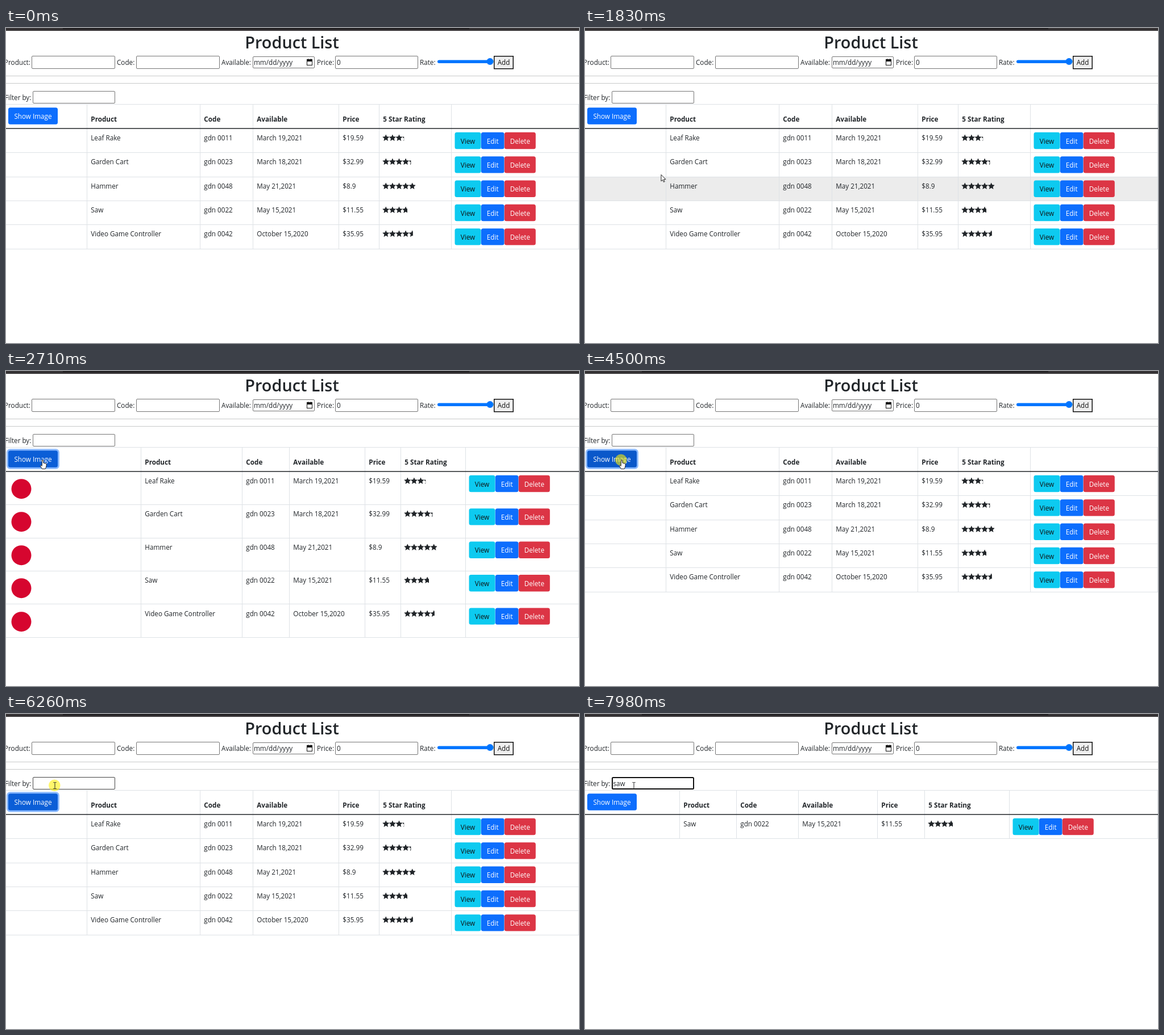
An HTML page with a canvas that plays this animation: 1008x555 px, repeating every 8000 ms.

```html
<!DOCTYPE html>
<html lang="en">
<head>
<meta charset="utf-8">
<title>Product List</title>
<style>
html, body { margin: 0; width: 100%; height: 100%; overflow: hidden; background: #fff; }
canvas { display: block; width: 1008px; height: 555px; }
</style>
</head>
<body>
<canvas id="stage" width="1008" height="555"></canvas>
<script>
const ctx = document.getElementById('stage').getContext('2d');
const LOOP = 8000;
const INK = '#212529', LINE = '#dee2e6', BLUE = '#0d6efd';
const FAMILY = '"Open Sans", "Noto Sans", sans-serif';
const BODY = '11.7px ' + FAMILY;
const BOLD = 'bold 11.7px ' + FAMILY;
const TITLE = '600 28.8px ' + FAMILY;
const TABLE_TOP = 177.3;

const products = [
  { name: 'Leaf Rake', code: 'gdn 0011', date: 'March 19,2021', price: '$19.59', stars: 3.25 },
  { name: 'Garden Cart', code: 'gdn 0023', date: 'March 18,2021', price: '$32.99', stars: 4.3 },
  { name: 'Hammer', code: 'gdn 0048', date: 'May 21,2021', price: '$8.9', stars: 5 },
  { name: 'Saw', code: 'gdn 0022', date: 'May 15,2021', price: '$11.55', stars: 3.75 },
  { name: 'Video Game Controller', code: 'gdn 0042', date: 'October 15,2020', price: '$35.95', stars: 4.6 }
];
const heads = ['Product', 'Code', 'Available', 'Price', '5 Star Rating'];
const layouts = {
  plain: { cols: [142, 341, 434, 585, 656, 783], h: 42.35 },
  images: { cols: [237, 415, 498, 631, 694, 808], h: 58.4 },
  filtered: { cols: [166, 266, 375, 514, 597, 746], h: 42.35 }
};

// press, effect and end of the highlight
const clicks = [
  [2500, 2660, 2710], [3780, 3920, 4060], [4430, 4570, 4710],
  [5030, 5180, 5260], [6260, 6330, 6480]
];
const FOCUS = 6330;
const typed = [[7590, 'saw'], [7470, 'sa'], [7130, 's']];

// pointer path: time, x, y
const path = [
  [1180, 236, 550], [1706, 148, 279], [1970, 92, 197], [2050, 75, 176.5],
  [2112, 69, 172], [2360, 64, 157], [5510, 64, 157], [5950, 86, 126]
];
// spans where the pointer advances in regular steps
const spans = [[1180, 1970, 65.8], [2050, 2360, 62], [5510, 5950, 73.3]];

function stepTime(t) {
  const s = spans.filter(s => t >= s[0]).pop();
  if (!s) return 0;
  return Math.min(s[1], s[0] + Math.floor((t - s[0]) / s[2]) * s[2]);
}

function pointerAt(t) {
  const q = stepTime(t);
  if (q < path[0][0]) return null;
  for (let i = 1; i < path.length; i++) {
    const a = path[i - 1], b = path[i];
    if (q <= b[0]) {
      const k = (q - a[0]) / (b[0] - a[0]);
      return { x: a[1] + (b[1] - a[1]) * k, y: a[2] + (b[2] - a[2]) * k };
    }
  }
  const end = path[path.length - 1];
  return { x: end[1], y: end[2] };
}

function rect(x, y, w, h, color) {
  ctx.fillStyle = color;
  ctx.fillRect(x, y, w, h);
}

function rounded(x, y, w, h, r, color) {
  ctx.beginPath();
  ctx.roundRect(x, y, w, h, r);
  ctx.fillStyle = color;
  ctx.fill();
}

function disc(x, y, r, color) {
  ctx.beginPath();
  ctx.arc(x, y, r, 0, Math.PI * 2);
  ctx.fillStyle = color;
  ctx.fill();
}

function text(s, x, y, color = INK, font = BODY, align = 'left') {
  ctx.font = font;
  ctx.textAlign = align;
  ctx.fillStyle = color;
  ctx.fillText(s, x, y);
}

function field(x, y, w, h, color = '#767676', width = 1) {
  ctx.beginPath();
  ctx.roundRect(x + width / 2, y + width / 2, w - width, h - width, 1.5);
  ctx.fillStyle = '#fff';
  ctx.fill();
  ctx.strokeStyle = color;
  ctx.lineWidth = width;
  ctx.stroke();
}

function button(label, x, y, w, h, fill, color = '#fff') {
  rounded(x, y, w, h, 3.5, fill);
  text(label, x + w / 2, y + h / 2 + 5, color, BODY, 'center');
}

function poly(points) {
  ctx.beginPath();
  points.forEach(([x, y]) => ctx.lineTo(x, y));
  ctx.closePath();
}

function stars(x, y, n) {
  ctx.save();
  ctx.beginPath();
  ctx.rect(x - 1, y - 8, n * 11.6 + 1, 16);
  ctx.clip();
  ctx.fillStyle = INK;
  for (let i = 0; i < Math.ceil(n); i++) {
    const pts = [];
    for (let k = 0; k < 10; k++) {
      const r = k % 2 ? 3 : 6.4, a = k * Math.PI / 5 - Math.PI / 2;
      pts.push([x + 5.8 + i * 11.6 + r * Math.cos(a), y + 0.3 + r * Math.sin(a)]);
    }
    poly(pts);
    ctx.fill();
  }
  ctx.restore();
}

function drawForm() {
  rect(0, 0, 1008, 5, '#353234');
  rect(100, 0, 715, 2, '#1f1d1f');
  text('Product List', 503, 36, INK, TITLE, 'center');

  text('Product:', -3, 65);
  field(45, 49, 147, 23);
  text('Code:', 195, 65);
  field(229, 49, 147, 23);
  text('Available:', 379, 65);
  field(434, 50, 109, 21);
  text('mm/dd/yyyy', 436, 65);
  ctx.strokeStyle = '#111';
  ctx.lineWidth = 1;
  ctx.strokeRect(529.5, 56.5, 9, 9);
  rect(529, 55, 10, 4, '#111');
  rect(531, 54, 1, 2, '#111');
  rect(536, 54, 1, 2, '#111');
  text('Price:', 547, 65);
  field(579, 49, 146, 23);
  text('0', 582, 65);
  text('Rate:', 728, 65);
  rounded(759, 56.5, 98, 5.5, 2.8, '#0075ff');
  disc(851.5, 59, 6, '#0075ff');
  rect(858, 49, 35, 23.5, '#111');
  rect(859.5, 50.5, 32, 20.5, '#efefef');
  text('Add', 875.5, 65, '#111', BODY, 'center');

  rect(0, 84, 1008, 1, '#c8c9ca');
  rect(0, 97, 1008, 1, '#c8c9ca');
}

function drawFilter(t) {
  text('Filter by:', -2, 127);
  const focused = t >= FOCUS;
  const border = focused ? '#101010' : t >= 5880 ? '#444' : '#767676';
  field(47, 111, 145, 22, border, focused ? 2 : 1);
  if (!focused) return;

  const entry = typed.find(e => t >= e[0]);
  const value = entry ? entry[1] : '';
  text(value, 49.5, 127);
  const caretOn = t < 6790 || (t >= 7130 && t < 7980);
  if (caretOn) rect(Math.round(49.5 + ctx.measureText(value).width), 114, 1, 16, '#111');
}

function drawToggle(t) {
  const ring = t >= clicks[0][1] && t < FOCUS;
  const pressed = clicks.slice(0, 4).some(c => t >= c[0] + 60 && t < c[1]);
  const hover = t >= 2174 && t < FOCUS;
  if (ring) rounded(1.2, 137.3, 92.6, 35.4, 6, '#8ab9fe');
  button('Show Image', 4, 140.3, 87, 29.4, pressed ? '#0a58ca' : hover ? '#0b5ed7' : BLUE);
}

function drawTable(t) {
  const filtered = t >= typed[2][0];
  const toggles = clicks.slice(0, 4).filter(c => t >= c[1]).length;
  const images = toggles % 2 === 1;
  const { cols, h } = layouts[filtered ? 'filtered' : images ? 'images' : 'plain'];
  const rows = filtered ? products.filter(p => p.name.toLowerCase().includes('s')) : products;

  // the row highlight trails the pointer by one step
  const p = t < 2360 ? pointerAt(t - 60) : null;
  const hot = p ? Math.floor((p.y - TABLE_TOP) / h) : -1;
  if (hot >= 0 && hot < rows.length) {
    rect(0, Math.round(TABLE_TOP + hot * h), 1008, Math.round(h), '#ececec');
  }

  const bottom = Math.floor(TABLE_TOP + rows.length * h);
  rect(0, 134, 1008, 1, LINE);
  [...cols, 1007].forEach(x => rect(x, 134, 1, bottom - 134, LINE));
  rows.forEach((_, i) => rect(0, Math.floor(TABLE_TOP + (i + 1) * h), 1008, 1, LINE));
  rect(0, 176.3, 1008, 1.5, INK);

  heads.forEach((s, i) => text(s, cols[i] + 7.3, 165, INK, BOLD));
  drawToggle(t);

  rows.forEach((row, i) => {
    const dy = Math.round(i * h);
    [row.name, row.code, row.date, row.price].forEach((s, k) => text(s, cols[k] + 7.3, 198 + dy));
    stars(cols[4] + 6.5, 193.5 + dy, row.stars);
    const x = cols[5] + 6.5, y = 183.8 + i * h;
    button('View', x, y, 46, 29.4, '#0dcaf0', '#111');
    button('Edit', x + 46.3, y, 40.7, 29.4, BLUE);
    button('Delete', x + 87.3, y, 55, 29.4, '#dc3545');
    if (images) disc(27, 207.7 + dy, 17.5, '#d6062f');
  });
}

function outline(fill, stroke) {
  ctx.fillStyle = fill;
  ctx.fill();
  ctx.strokeStyle = stroke;
  ctx.lineWidth = 1;
  ctx.stroke();
}

function arrow() {
  poly([[0, 0], [0, 11.5], [2.7, 9], [4.4, 13], [6.2, 12.2], [4.5, 8.3], [8, 8.2]]);
  outline('#fff', '#222');
}

function hand() {
  poly([[-0.5, 0], [1.5, 0], [2, 5], [6.5, 6.2], [7.3, 8], [6.5, 12.5], [5.2, 15.5], [-0.5, 15.5], [-3.5, 10.5], [-2.5, 9], [-0.8, 10.3]]);
  outline('#fff', '#222');
}

function beam() {
  rect(-0.5, -5.5, 1, 11, '#222');
  [-6, 5].forEach(y => {
    rect(-2.5, y, 2, 1, '#222');
    rect(0.5, y, 2, 1, '#222');
  });
}

function drawPointer(t) {
  const p = pointerAt(t);
  if (!p) return;
  const click = clicks.find(c => t >= c[0] && t < c[2]);
  if (click) {
    const fading = t >= click[2] - 70 && t >= click[1];
    disc(p.x - 0.7, p.y - 0.3, 10.3, `rgba(255,240,0,${fading ? 0.25 : 0.58})`);
  }
  const onToggle = p.y >= 140 && p.y <= 170 && p.x <= 91;
  const onField = p.y >= 111 && p.y <= 133;
  ctx.save();
  ctx.translate(p.x, p.y);
  (onToggle ? hand : onField ? beam : arrow)();
  ctx.restore();
}

function draw(t) {
  rect(0, 0, 1008, 555, '#fff');
  drawForm();
  drawTable(t);
  drawFilter(t);
  drawPointer(t);
}

const start = performance.now();
function tick() {
  draw((performance.now() - start) % LOOP);
  requestAnimationFrame(tick);
}
tick();
</script>
</body>
</html>
```
